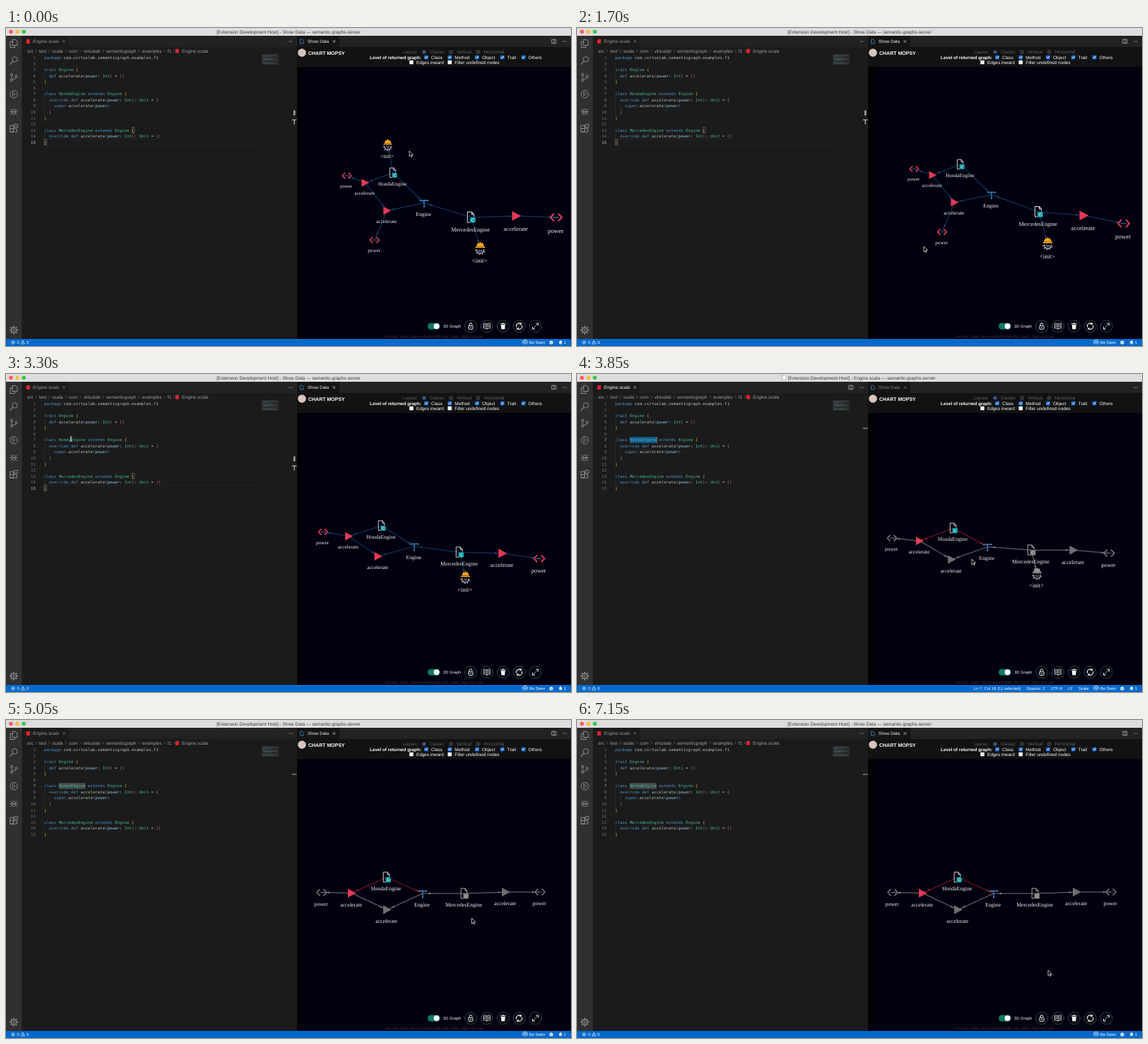
These frames come from a looping animation (800x450 px, 7.2 s). An HTML page:

```html
<!DOCTYPE html>
<html lang="en">
<head>
<meta charset="utf-8">
<title>Code graph</title>
<style>
html, body { margin: 0; width: 100%; height: 100%; overflow: hidden; background: #1b1b1b; }
svg { display: block; width: 800px; height: 450px; }
text { font-family: "Liberation Sans", Arial, sans-serif; text-rendering: geometricPrecision; }
.code text { font: 5.73px "DejaVu Sans Mono", Menlo, monospace; }
.label { font-family: "Liberation Serif", "Times New Roman", serif; fill: #f2f2f2; text-anchor: middle; }
.line { fill: none; stroke-linecap: round; stroke-linejoin: round; }
.dim { filter: grayscale(1) contrast(.5); }
</style>
</head>
<body>
<svg id="stage" viewBox="0 0 800 450" xmlns="http://www.w3.org/2000/svg"></svg>
<script>
const LOOP = 7200, STEP = 50;
const SELECT = 3450, REFOCUS = 4400;
const stage = document.getElementById('stage');

// Markup helpers
const rect = (x, y, w, h, fill, more = '') => `<rect x="${x}" y="${y}" width="${w}" height="${h}" fill="${fill}" ${more}/>`;
const dot = (x, y, r, fill, more = '') => `<circle cx="${x}" cy="${y}" r="${r}" fill="${fill}" ${more}/>`;
const ring = (x, y, r, color, w = 1) => dot(x, y, r, 'none', `stroke="${color}" stroke-width="${w}"`);
const line = (d, color, w = 1, more = '') => `<path class="line" d="${d}" stroke="${color}" stroke-width="${w}" ${more}/>`;
const text = (x, y, str, size, fill, more = '') => `<text x="${x}" y="${y}" font-size="${size}" fill="${fill}" ${more}>${str}</text>`;
const phase = (names, body) => `<g data-on="${names}">${body}</g>`;
const at = (x, y, body) => `<g transform="translate(${x} ${y})">${body}</g>`;
const cross = (x, y, color) => line(`M${x - 1.7} ${y - 1.7}l3.4 3.4m0-3.4l-3.4 3.4`, color, .6);
const ellipsis = (x, y) => [-2, 0, 2].map(d => dot(x + d, y, .6, '#c5c5c5')).join('');
const splitIcon = x => line(`M${x - 2.8} 16.2h5.6v5.4h-5.6zM${x} 16.2v5.4`, '#c5c5c5', .7);

// Lays words out in a row; each is drawn at its own start
const pen = document.createElement('canvas').getContext('2d');
pen.font = '100px "Liberation Sans", Arial, sans-serif';
const width = (str, size) => pen.measureText(str).width * size / 100;
function flow(x, gap, size, words, put) {
  return words.map((word, i) => {
    const out = put(x, word, i);
    x += width(word, size) + gap;
    return out;
  }).join('');
}

function titleBar() {
  const title = name => `[Extension Development Host] - ${name} — semantic-graphs-server`;
  const put = (x, name) => text(x, 7.6, title(name), 6.5, '#3c3c3c', 'text-anchor="middle"');
  return rect(0, 0, 800, 11, '#dedcde')
    + ['#fc5b57', '#fdbc40', '#34c84a'].map((c, i) => dot(7 + 9.1 * i, 5.2, 2.8, c)).join('')
    + phase('start back', put(400, 'Show Data'))
    + phase('edit', put(403, 'Engine.scala') + line('M291 2.2h3l1.6 1.6v4.6h-4.6z', '#8a8a8a', .5, 'style="fill:#fff"'));
}

function activityBar() {
  const c = '#8c8c8c';
  const spokes = [...Array(8).keys()].map(i => line('M0-4v-1.2', c, 1.8, `transform="rotate(${i * 45})"`)).join('');
  const icons = [
    line('M-1.5-5.5h4l2.5 2.5v5.5h-6.5zM-1.5-2.5h-3.5v8h6.5v-2.5', c),
    ring(1.5, -1.5, 3.7, c) + line('M-1.2 1.2l-4 4.2', c, 1.2),
    ring(-3, -4, 1.6, c) + ring(-3, 4, 1.6, c) + ring(3.5, -1.5, 1.6, c) + line('M-3-2.3v4.6M3.5.2c0 2-3 2-5 2.3', c),
    ring(0, 0, 5.2, c) + line('M-1.5-2.5v5l3.5-2.5z', c, .8),
    line('M-3 1a3 4 0 0 1 6 0a3 4 0 0 1-6 0M-5.5 1h11M-5-3l2 2M5-3l-2 2M-5 5l2-2M5 5l-2-2M-2-1l4 4M2-1l-4 4', c, .8),
    line('M-5-3.5h4.5v9h-4.5zM-5 1h9.5v4.5h-9.5M1.2-5.2h4.2v4.2h-4.2z', c)
  ];
  return rect(0, 11, 22.5, 429, '#303031')
    + icons.map((icon, i) => at(11, 22 + 23.9 * i, icon)).join('')
    + at(11, 427.5, ring(0, 0, 3.8, c) + ring(0, 0, 1.5, c) + spokes);
}

const SOURCE = `package com.virtuslab.semanticgraph.examples.f1

trait Engine {
  def accelerate(power: Int) = ()
}

class HondaEngine extends Engine {
  override def accelerate(power: Int): Unit = {
    super.accelerate(power)
  }
}

class MercedesEngine extends Engine {
  override def accelerate(power: Int): Unit = ()
}`.split('\n');
const CHAR = 3.45, ROW = 8.55;
const rowY = n => 42 + ROW * (n - 1);
const colX = n => 54 + CHAR * n;
const indent = str => str.length - str.trimStart().length;

let depth = 0;
function paint(token) {
  const pairs = ['#dcb52c', '#c070bc', '#3a94dc'];
  if (/^[({]$/.test(token)) return pairs[depth++ % 3];
  if (/^[)}]$/.test(token)) return pairs[--depth % 3];
  if (/^(package|trait|class|extends|override|def|super)$/.test(token)) return '#4f92c8';
  if (/^[A-Z]/.test(token)) return '#45b39d';
  if (token === 'accelerate') return '#a9bfae';
  if (token === 'power') return '#8ac4e2';
  return '#b8c0c4';
}

function codeLine(str, i) {
  const y = rowY(i + 1) + 2, body = str.trimStart();
  const spans = (body.match(/\w+|[(){}]|[^\w(){}]+/g) || [])
    .map(tok => `<tspan fill="${paint(tok)}">${tok}</tspan>`).join('');
  return `<text class="number" x="42" y="${y}" text-anchor="end">${i + 1}</text><text x="${colX(indent(str))}" y="${y}">${spans}</text>`;
}

function editor() {
  const grey = '#a0a0a0', red = '#e0252b';
  const crumbs = 'src test scala com virtuslab semanticgraph examples f1'.split(' ');
  const guides = SOURCE.map((str, i) => [...Array(indent(str) / 2).keys()]
    .map(k => rect(colX(2 * k), rowY(i + 1) - 4.2, .5, ROW, '#3c3c3c')).join('')).join('');
  const mini = SOURCE.map((str, i) => rect(363 + indent(str) * .5, 38 + i * .9, str.trim().length * .42, .5, '#55858c', 'opacity=".7"')).join('');
  const box = (col, n) => rect(colX(col), rowY(n) - 4, 3.8, 8, 'none', 'stroke="#808080" stroke-width=".5"');
  const selected = color => rect(colX(6), rowY(7) - 4.2, 11 * CHAR, ROW, color);
  const name = color => text(38, 21.3, 'Engine.scala', 6.46, color, 'font-style="italic"');
  return rect(22.5, 11, 389.5, 429, '#1b1b1b') + rect(22.5, 11, 389.5, 16, '#222223') + rect(22.5, 11, 66, 16, '#1b1b1b')
    + rect(28.8, 16, 5, 6, red)
    + phase('start back', name('#9a9a9a') + cross(82, 19, '#8a8a8a'))
    + phase('edit', name('#fff') + cross(82, 19, '#d0d0d0') + splitIcon(388))
    + ellipsis(403, 19)
    + flow(30, 8.2, 6.5, crumbs, (x, word) => text(x, 34.8, word, 6.5, grey)
      + line(`M${x + width(word, 6.5) + 3.3} 30.8l1.6 1.7l-1.6 1.7`, '#8a8a8a', .5))
    + rect(240, 29.7, 4.8, 5.8, red) + text(249, 34.8, 'Engine.scala', 6.5, grey)
    + rect(362, 37, 24, 15, '#2b2b2b') + mini
    + phase('start', line(`M54 ${rowY(15) - 4.2}H362m0 ${ROW}H54`, '#292929', .7) + box(36, 13) + box(0, 15)
      + rect(407, 116.5, 2.6, 7, grey) + line('M405.500 130h5.5m-2.700 0v6', grey, 1.5))
    + phase('edit', selected('#145c92')) + phase('back', selected('#45494b'))
    + phase('edit back', rect(405, 76.3, 6.5, 1.2, grey))
    + guides + `<g class="code">${SOURCE.map(codeLine).join('')}</g>`
    + phase('edit', rect(colX(17), rowY(7) - 4.2, .6, ROW, '#d0d0d0'));
}

function panel() {
  const w = '#f4f4f4', faint = '#626262';
  const bold = 'font-weight="bold"';
  const check = (x, y, on) => rect(x - 2.8, y - 2.8, 5.6, 5.6, on ? '#1a73e8' : '#f5f5f5', 'rx=".8"')
    + (on ? line(`M${x - 1.6} ${y}l1.2 1.3l2.2-2.7`, '#fff', .9) : '');
  const option = (y, on) => (x, word) => check(x - 7, y, on) + text(x, y + 2.2, word, 6.4, '#fff');
  const radio = (x, word, i) => dot(x - 8, 34, 2.8, i ? '#303030' : '#1b3d68', `stroke="#444" stroke-width=".6"`)
    + (i ? '' : dot(x - 8, 34, 1.2, '#5a7aa4')) + text(x, 36.3, word, 6.44, faint);
  const buttons = [
    rect(-3, -.8, 6, 5, 'none', `rx=".6" stroke="${w}"`) + line('M-2-1v-1.5a2 2 0 0 1 4 0', w) + dot(0, 1.6, .8, w),
    line('M0-3c-1.5-1.2-3-1.2-4.500-1v7c1.5-.2 3-.2 4.500 1c1.5-1.2 3-1.2 4.500-1v-7c-1.5-.2-3-.2-4.500 1v7M-3-1.5h1.5M-3 .5h1.5M1.5-1.5h1.5M1.5.5h1.5', w, .8),
    `<path d="M-3-2h6l-.6 6.200h-4.800z" fill="${w}"/>` + line('M-3.700-3.200h7.400M-1.200-4.200h2.400', w),
    line('M-4 1a4 4 0 0 1 6.500-4.200M2.800-4.700v2h-2M4-1a4 4 0 0 1-6.500 4.200M-2.800 4.700v-2h2', w, 1.1),
    line('M-3.800 3.800L3.800-3.800', w, .9, 'stroke-dasharray="1.5 1.8"') + line('M1.200-4h2.800v2.800M-1.200 4h-2.800v-2.800', w)
  ];
  const tab = color => text(427, 21.3, 'Show Data', 6.2, color) + cross(464.5, 19, color);
  return rect(412, 11, 388, 429, '#000') + rect(412, 11, 388, 16, '#222223') + rect(412, 11, 60, 16, '#151515')
    + rect(412, 27, 388, 28.5, '#121212')
    + line('M417 16.2h2.600l1.600 1.600v4.200h-4.200z', '#3d8fd0', .8)
    + phase('start back', tab('#f4f4f4') + splitIcon(776)) + phase('edit', tab('#858585'))
    + ellipsis(791, 19)
    + rect(420, 55.5, 380, 384.5, '#00000f')
    + dot(419, 35, 5.8, '#d8c4bc') + text(428, 37.6, 'CHART MOPSY', 7, '#fff', bold)
    + text(562, 36.3, 'Layout:', 6.3, faint) + flow(600, 17.3, 6.44, ['Classic', 'Vertical', 'Horizontal'], radio)
    + text(515, 43.7, 'Level of returned graph:', 6.35, '#fff', bold)
    + flow(602, 17.3, 6.4, ['Class', 'Method', 'Object', 'Trait', 'Others'], option(41.5, true))
    + flow(581, 15.5, 6.4, ['Edges inward', 'Filter undefined nodes'], option(48.5, false))
    + rect(597, 417.5, 17.5, 9, '#0f7a63', 'rx="4.5"') + dot(609.6, 422, 4, '#fff')
    + text(619, 424.2, '3D Graph', 5.8, w)
    + buttons.map((icon, i) => at(658 + 22.9 * i, 422, dot(0, 0, 8.6, '#05080f', 'stroke="#34505a" stroke-width=".8"') + icon)).join('')
    + text(536, 437.7, 'Left-click: rotate, Mouse-wheel/middle-click: zoom, Right-click: pan', 4.75, '#3c3c42');
}

function statusBar() {
  const w = '#fff', blue = '#0069cd', put = (x, str) => text(x, 447, str, 5.85, w);
  return rect(0, 440, 800, 10, blue)
    + ring(10, 445, 2.3, w, .6) + line('M9.2 444.2l1.6 1.6m0-1.6l-1.6 1.6', w, .6)
    + put(15.5, '0') + line('M24 442.5l2.5 4.6h-5zM24 444v1.5', w, .6) + put(29, '0')
    + phase('edit', flow(562, 8, 5.85, ['Ln 7, Col 18 (11 selected)', 'Spaces: 2', 'UTF-8', 'LF', 'Scala'], put))
    + dot(735, 444.5, .8, w) + line('M733.5 446a2.2 2.2 0 1 1 3 0M732.5 447.2a3.6 3.6 0 1 1 5 0M735 445v2.8', w, .6)
    + put(741, 'Be Seen')
    + dot(772, 445, 2.6, w) + line('M770.7 445.5q1.3 1.6 2.6 0M771 444.2h.1M772.9 444.2h.1', blue, .7)
    + `<path d="M782.5 446.6q1-1 1-2.6a1.7 1.7 0 0 1 3.4 0q0 1.6 1 2.6zM784.3 447h1.8l-.9 1z" fill="${w}"/>` + put(790, '1');
}

// Graph icons, drawn for a label size of 8
const ICON = {
  power: line('M-3.2-4.2L-7.2 0L-3.2 4.2M3.2-4.2L7.2 0L3.2 4.2', '#e83a58', 1.8)
    + [-2.4, 0, 2.4].map(x => dot(x, 0, .8, '#3f8fb8')).join(''),
  accelerate: '<path d="M-5.6-6.4L6.4 0L-5.6 6.4z" fill="#e63a58"/>' + line('M-3.6-3.5L3 0L-3.6 3.5', '#c83554', .6),
  klass: line('M-1.5 7H-5V-7.5H1L4-4V-1M1-7.5V-4H4', '#d8d8dc', 1)
    + rect(-1.6, 0, 7.8, 7.4, '#129ca4', 'rx="1"') + line('M4 2.4a2 2 0 1 0 0 2.8', '#a8f0f0', .9),
  trait: line('M-5.5-3.5H5.5M0-3.5V5.5', '#3570b0', 1.6)
    + [[-5.5, -3.5], [5.5, -3.5], [0, 5.5], [0, -3.5]].map(p => dot(...p, 1.2, '#3f8ab8')).join(''),
  init: line('M-4.600 2.500a4.600 4.600 0 0 0 9.200 0', '#a0a0a4', 1.6)
    + line('M-6 2.500a6 6 0 0 0 12 0', '#a0a0a4', 1.4, 'stroke-dasharray="1.500 2.300" style="stroke-linecap:butt"') + line('M-1.800 2.500a1.800 1.800 0 0 0 3.600 0', '#a0a0a4', 1)
    + '<path d="M-5-1.500a5 4.800 0 0 1 10 0z" fill="#f09c14"/>' + line('M-5.800-.6h11.600M0-6.800v3M-2.600-5.800v2M2.600-5.800v2', '#ffb224', 1.3)
};

// icon, label, then the key places: first, after the turn, at rest
const NODES = {
  hondaInit: ['init', '&lt;init&gt;', [540.5, 165]],
  honda: ['klass', 'HondaEngine', [548, 205], [535, 210.5], [539, 222.5]],
  powerA: ['power', 'power', [482.5, 209], [457, 212], [447, 244]],
  callA: ['accelerate', 'accelerate', [508.5, 219], [490, 221], [489.5, 245]],
  callB: ['accelerate', 'accelerate', [539.5, 258.5], [527, 252], [539.5, 268.5]],
  engine: ['trait', 'Engine', [592, 247.5], [578.5, 243], [590, 245.5]],
  powerB: ['power', 'power', [522, 300], [517, 296]],
  mercedes: ['klass', 'MercedesEngine', [658.5, 268], [645.5, 256], [649, 245.5]],
  mercedesInit: ['init', '&lt;init&gt;', [671.5, 311], [654, 294], [657, 275]],
  callC: ['accelerate', 'accelerate', [722.5, 266], [707.5, 259.5], [707.5, 243.5]],
  powerC: ['power', 'power', [779, 268], [761.5, 271], [756, 243.5]]
};
const REMOVED = { hondaInit: 800, powerB: 2300, mercedesInit: 4550 };
const EDGES = ['honda hondaInit', 'callA powerA', 'honda callA', 'callA callB', 'honda engine', 'engine callB',
  'callB powerB', 'mercedes engine', 'mercedes callC', 'callC powerC', 'mercedes mercedesInit'].map(s => s.split(' '));
const LIT = ['honda', 'callA', 'engine'];

// Pointer stops: arrive, leave, x, y
const STOPS = [[0, 0, 571, 174], [600, 1250, 540, 165], [1700, 1700, 491, 309], [2150, 2800, 514, 290],
  [3200, 3500, 92, 92], [3850, 3850, 559, 262], [4300, 5350, 659.5, 280.5], [5900, LOOP, 667, 354]];

stage.innerHTML = editor() + panel() + '<g id="edges"></g><g id="nodes"></g>' + titleBar() + activityBar() + statusBar()
  + '<g id="pointer"><path id="arrow" d="M0 0V7.6L1.7 6L2.9 8.6L4.2 8L3 5.5H5.3z" fill="#000" stroke="#fff" stroke-width=".7"/>'
  + line('M-1.2-3.5q1.2 0 1.2 1v5q0 1-1.2 1M1.2-3.5q-1.2 0-1.2 1v5q0 1 1.2 1', '#e8e8e8', .7, 'id="beam"') + '</g>';
const find = id => document.getElementById(id);

find('nodes').innerHTML = Object.entries(NODES).map(([id, n]) =>
  `<g id="${id}"><g>${ICON[n[0]]}</g><text class="label">${n[1]}</text></g>`).join('');
const phased = [...stage.querySelectorAll('[data-on]')];
const numbers = [...stage.querySelectorAll('.number')];
const show = (el, on) => { el.style.display = on ? '' : 'none'; };
const ramp = (t, from, to) => Math.min(1, Math.max(0, (t - from) / (to - from || 1)));
const mix = (a, b, k) => a.map((v, i) => v + (b[i] - v) * k);

// The graph drifts up and bows, turns, then swings flat and comes to rest
function place([, , first, turned = first, rest = turned], t) {
  const turn = ramp(t, 1700, 2700), settle = 1 - (1 - ramp(t, 2700, 5050)) ** 1.5;
  const drift = ramp(t, 0, 1100) * (1 - turn);
  const [x, y] = mix(mix(first, turned, turn), rest, settle);
  const bow = 4.3 * ((x - 560) / 100) ** 2;
  return [x - 5 * drift - 5 * Math.sin(Math.PI * settle), y + (bow - 12) * drift];
}

function labelSize([icon], x, t) {
  const depthLeft = 1 - (ramp(t, 1700, 2700) + ramp(t, 2700, 5050) * 2) / 3;
  return 7.75 + .007 * (x - 600) * depthLeft + (icon === 'init' ? .6 : 0);
}

function drawEdge([from, to], spots, lit) {
  if (!spots[from] || !spots[to]) return '';
  const [ax, ay] = spots[from], [bx, by] = spots[to];
  const angle = Math.atan2(by - ay, bx - ax), gap = 7;
  const red = lit && LIT.includes(from) && LIT.includes(to);
  const [color, tip] = red ? ['#7a1519', '#a81f25'] : lit ? ['#505058', '#7c7c84'] : ['#0e2a50', '#1a4275'];
  return line(`M${ax} ${ay}L${bx} ${by}`, color, red ? 1.2 : 1.5)
    + `<path d="M0 0L-4-1.5V1.5z" fill="${tip}" transform="translate(${bx - Math.cos(angle) * gap} ${by - Math.sin(angle) * gap}) rotate(${angle * 180 / Math.PI})"/>`;
}

function drawGraph(t) {
  const lit = t >= SELECT, spots = {};
  for (const [id, node] of Object.entries(NODES)) {
    const el = find(id), alive = t < (REMOVED[id] || LOOP);
    show(el, alive);
    if (!alive) continue;
    const [x, y] = spots[id] = place(node, t), size = labelSize(node, x, t);
    const [icon, label] = el.children;
    icon.setAttribute('transform', `translate(${x} ${y}) scale(${size / 8})`);
    icon.classList.toggle('dim', lit && !LIT.includes(id));
    label.setAttribute('x', x - .8);
    label.setAttribute('y', y + size * 2.42);
    label.setAttribute('font-size', size);
  }
  find('edges').innerHTML = EDGES.map(e => drawEdge(e, spots, lit)).join('');
}

function drawPointer(t) {
  const i = STOPS.findLastIndex(s => t >= s[0]);
  const [, leave, ...here] = STOPS[i], [arrive, , ...next] = STOPS[i + 1] || STOPS[i];
  const [x, y] = mix(here, next, ramp(t, leave, arrive));
  find('pointer').setAttribute('transform', `translate(${x} ${y})`);
  show(find('arrow'), x >= 412);
  show(find('beam'), x < 412);
}

function draw(t) {
  const now = t < SELECT ? 'start' : t < REFOCUS ? 'edit' : 'back';
  const active = now === 'start' ? 15 : 7;
  phased.forEach(el => show(el, el.dataset.on.split(' ').includes(now)));
  numbers.forEach((el, i) => el.setAttribute('fill', i + 1 === active ? '#c0c0c0' : '#737373'));
  drawGraph(t);
  drawPointer(t);
}

const begin = performance.now();
function tick() {
  const t = Math.floor((performance.now() - begin) % LOOP / STEP) * STEP;
  draw(t < 100 ? 0 : t);
  requestAnimationFrame(tick);
}
tick();
</script>
</body>
</html>
```
